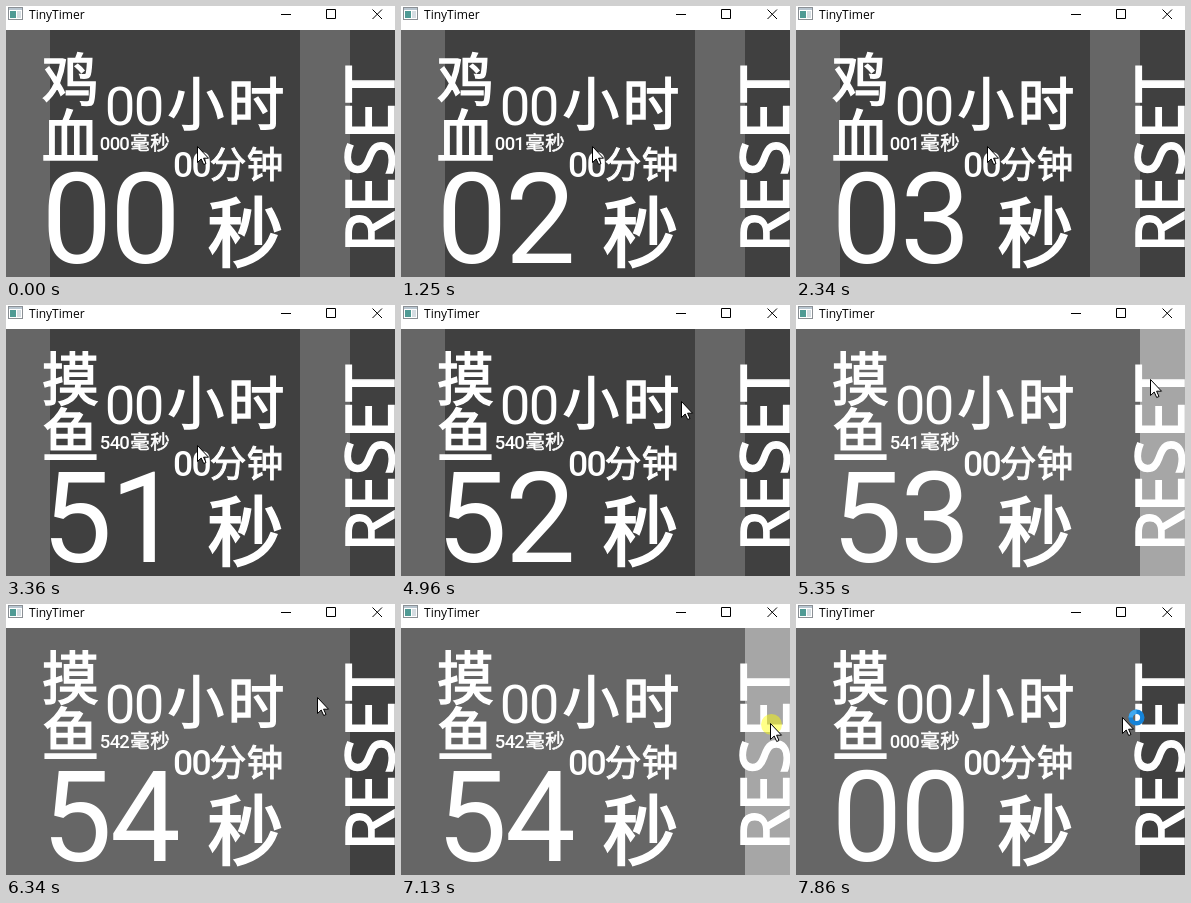
Recreate the animation shown at these times as an HTML page. Size 389x271 px, loop 8 s.

```html
<!DOCTYPE html>
<html lang="zh-CN">
<head>
<meta charset="utf-8">
<title>TinyTimer</title>
<style>
  html, body { margin: 0; width: 100%; height: 100%; overflow: hidden; background: #666; }
  svg { display: block; width: 389px; height: 271px; }
  .num { font-family: Roboto, "Liberation Sans", sans-serif; }
  .han { font-family: "Noto Sans CJK SC", "Noto Sans CJK", "Noto Sans CJK JP", sans-serif; stroke: #fff; stroke-width: .028em; }
  .face text { fill: #fff; text-anchor: middle; }
  .reset { font: 67px "Noto Sans", "Open Sans", sans-serif; stroke: #fff; stroke-width: 1.5px; }
  .title { font: 12px "Open Sans", "Noto Sans", sans-serif; }
</style>
</head>
<body>
<svg viewBox="0 0 389 271">
  <rect width="389" height="271" fill="#666"/>
  <rect id="panel" x="44" y="24" width="250" height="247" fill="#404040"/>
  <rect id="button" x="344" y="24" width="45" height="247"/>

  <g id="face" class="face">
    <text class="reset" transform="translate(387.5 271) rotate(-90)" x="45 82 119 156 193">RESET</text>
  </g>

  <rect width="389" height="24" fill="#fff"/>
  <g shape-rendering="crispEdges">
    <rect x="2.5" y="1.5" width="14" height="12" fill="#fff" stroke="#8a8f94"/>
    <rect x="3" y="2" width="13" height="2" fill="#b9c6d0"/>
    <rect x="4" y="5" width="6" height="7" fill="#4f9a94"/>
    <rect x="11" y="5" width="4" height="7" fill="#d5dde2"/>
  </g>
  <text class="title" x="23" y="13">TinyTimer</text>
  <g fill="none" stroke="#000">
    <path d="M275 8.5h10M320.5 3.5h9v9h-9z"/>
    <path d="M366.5 3.5l9.5 9.5m0-9.5l-9.5 9.5"/>
  </g>

  <g id="cursor">
    <circle id="press" cx="1.5" cy="1.5" r="10.5" fill="#ff0" fill-opacity=".47"/>
    <path d="M.5.5V16.5L4.2 13 6.7 18.5 9 17.5 6.6 12.2H11.5Z" fill="#fff" stroke="#000"/>
    <g id="busy" fill="none">
      <circle cx="14.5" cy="0.5" r="5.8" stroke="#1583d8" stroke-width="4.4"/>
      <path d="M8.7 .5A5.8 5.8 0 0 1 14.5 -5.3" stroke="#3fa9f0" stroke-width="4.4"/>
    </g>
  </g>
</svg>
<script>
const LOOP = 8000;
const $ = id => document.getElementById(id);

function label(cls, size, xs, y, str = "", weight = 400) {
  const el = document.createElementNS("http://www.w3.org/2000/svg", "text");
  el.setAttribute("class", cls);
  el.setAttribute("font-size", size);
  el.setAttribute("font-weight", weight);
  el.setAttribute("x", xs);
  el.setAttribute("y", y);
  el.textContent = str;
  $("face").append(el);
  return el;
}

const word = [label("han", 57, "64.5", 94.5), label("han", 57.5, "64.5", 151.5)];
label("num", 54.5, "114 143", 119, "00");
label("han", 56.5, "190 250", 119, "小时");
const millis = label("num", 18.5, "99 109 118.5", 143.5, "", 500);
label("han", 19.5, "134 154", 144, "毫秒");
label("num", 35.5, "177 195.5", 171, "00", 500);
label("han", 36.5, "222 259", 172, "分钟");
const seconds = label("num", 126, "71 139.5", 257);
label("han", 76, "239.5", 254.5, "秒");

// Each step lists only what changes; "at" is the pointer tip.
const steps = [
  { t: 0, word: "鸡血", sec: "00", ms: "000", at: [191, 140], press: false, busy: false },
  { t: 280, sec: "01" },
  { t: 1250, sec: "02", ms: "001" },
  { t: 2340, sec: "03" },
  { t: 3210, press: true },
  { t: 3360, press: false, word: "摸鱼", sec: "51", ms: "540" },
  { t: 4350, sec: "52" },
  { t: 4660, at: [195, 133] },
  { t: 4810, at: [236, 113] },
  { t: 4960, at: [280, 96] },
  { t: 5080, at: [320, 85] },
  { t: 5200, at: [354, 74] },
  { t: 5350, sec: "53", ms: "541" },
  { t: 5880, at: [331, 83] },
  { t: 6030, at: [311, 93] },
  { t: 6340, sec: "54", ms: "542" },
  { t: 6610, at: [336, 105] },
  { t: 6730, at: [361, 116] },
  { t: 6880, at: [369, 119] },
  { t: 7130, press: true },
  { t: 7280, press: false, sec: "00", ms: "000" },
  { t: 7710, at: [354, 118] },
  { t: 7860, at: [326, 113], busy: true }
];
const states = [];
steps.forEach((s, i) => states.push({ ...states[i - 1], ...s }));

const show = (id, on) => $(id).setAttribute("visibility", on ? "visible" : "hidden");

function draw(s) {
  const [x, y] = s.at;
  word.forEach((el, i) => el.textContent = s.word[i]);
  seconds.textContent = s.sec;
  millis.textContent = s.ms;
  show("panel", x >= 44 && x < 294);
  $("button").setAttribute("fill", x >= 344 ? "#a6a6a6" : "#404040");
  $("cursor").setAttribute("transform", `translate(${x} ${y})`);
  show("press", s.press);
  show("busy", s.busy);
}

const start = performance.now();
let last = null;
function tick() {
  const t = (performance.now() - start) % LOOP;
  const state = states.findLast(s => s.t <= t) || states[0];
  if (state !== last) draw(last = state);
  requestAnimationFrame(tick);
}
tick();
</script>
</body>
</html>
```
